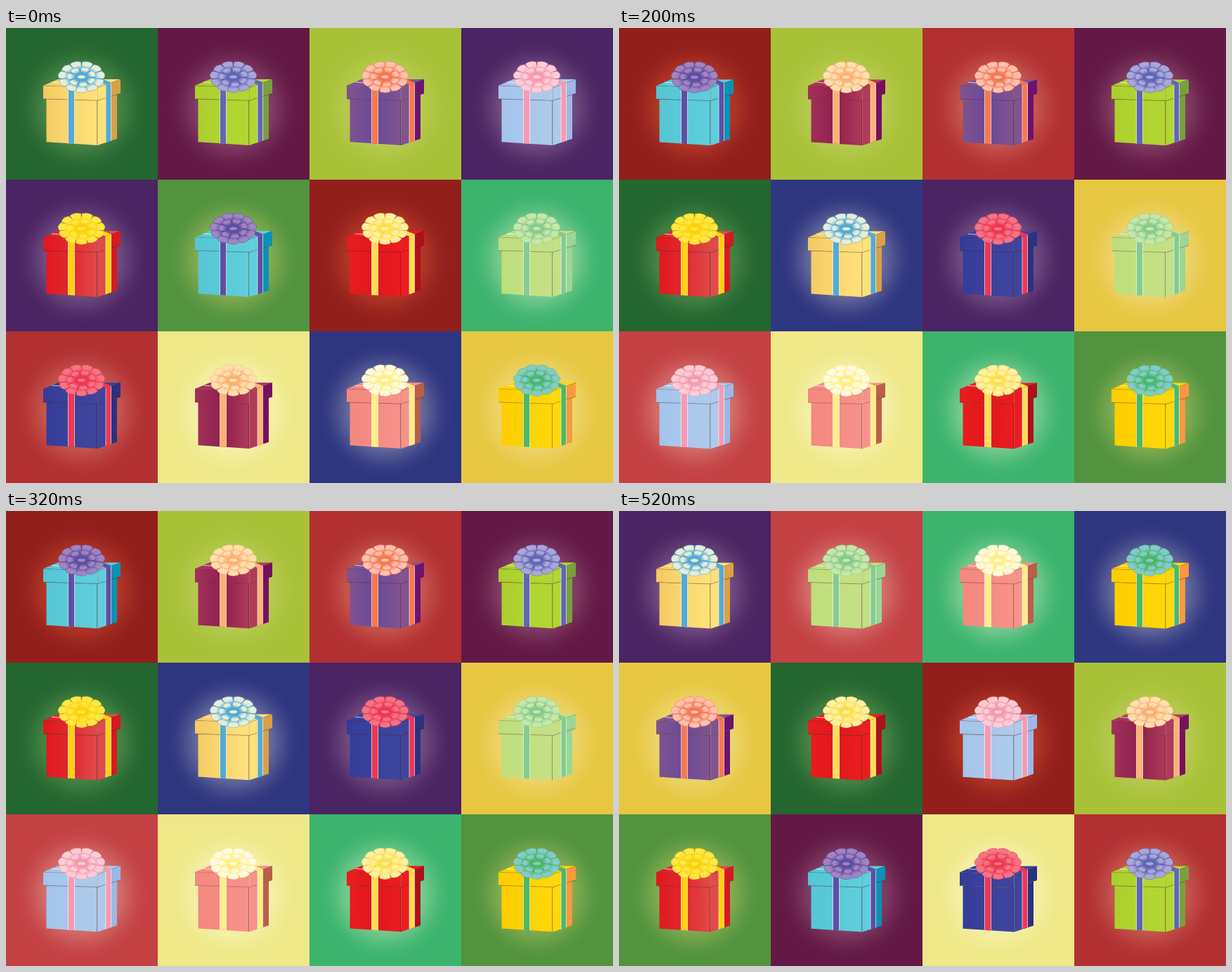
Write an HTML page with a canvas that moves like this. It is 864 px wide and 648 px high and loops after 600 ms.

```html
<!DOCTYPE html>
<html lang="en">
<head>
<meta charset="utf-8">
<title>Gift boxes</title>
<style>
html, body { margin: 0; width: 100%; height: 100%; overflow: hidden; }
canvas { display: block; }
</style>
</head>
<body>
<canvas id="stage" width="864" height="648"></canvas>
<script>
const ctx = document.getElementById('stage').getContext('2d');
const CELL = 216, HOLD = 200, TURN = Math.PI * 2;
const INK = 'rgba(50,10,30,.4)', SHEEN = 'rgba(255,255,255,.7)';

// backdrop and glow
const backs = {
  forest: ['#246630', '#548e4c'],
  plum: ['#631945', '#8b4a70'],
  lime: ['#a8c238', '#bccc5a'],
  purple: ['#4b2463', '#7c5a8a'],
  leaf: ['#52933f', '#92b456'],
  brick: ['#921f1c', '#bc3e2a'],
  mint: ['#3cb46e', '#8cd29c'],
  red: ['#b23032', '#cc6458'],
  cream: ['#efe888', '#f7f2b4'],
  navy: ['#2f3680', '#787ca6'],
  gold: ['#e7c741', '#efd97c'],
  rose: ['#c44143', '#d87e7a']
};

// front left, fold beside the ribbon, front right, far side, ribbon, bow tips
const kinds = {
  butter: ['#f4c964', '#fbd870', '#ffe17a', '#d9a048', '#55aad2', '#e4eeda'],
  apple: ['#aacf2e', '#b0d430', '#b2d632', '#7aa03c', '#6066b4', '#aaa6da'],
  violet: ['#80548e', '#6a4a98', '#80548e', '#6c1470', '#f77850', '#ffc0ae'],
  sky: ['#a4c4ec', '#a8c8ea', '#aecaea', '#9cb8e6', '#f59ab2', '#fccdd6'],
  cherry: ['#e0181e', '#e2282e', '#e04a4a', '#d61a20', '#fdd20c', '#ffe745'],
  aqua: ['#56c6d4', '#5acad8', '#60cedc', '#0c92b4', '#5f4ea4', '#a184c0'],
  scarlet: ['#ea1c1f', '#e0181c', '#ec1c20', '#b01019', '#fdde4e', '#fff0a2'],
  pale: ['#bede7c', '#c2e080', '#c4e086', '#9cd694', '#86cb90', '#c6e7a8'],
  indigo: ['#343c98', '#3a429c', '#3e459c', '#2a327f', '#f03654', '#f47484'],
  wine: ['#a4305a', '#8e204e', '#b03a5a', '#76105c', '#fdb172', '#ffe0b0'],
  salmon: ['#f4887e', '#f68c84', '#f7928a', '#ba5e48', '#feee86', '#fffbe2'],
  sun: ['#ffcd00', '#ffd204', '#ffd809', '#fb983e', '#4cb868', '#82cbca']
};

const scenes = [
  `butter/forest apple/plum violet/lime sky/purple
   cherry/purple aqua/leaf scarlet/brick pale/mint
   indigo/red wine/cream salmon/navy sun/gold`,
  `aqua/brick wine/lime violet/red apple/plum
   cherry/forest butter/navy indigo/purple pale/gold
   sky/rose salmon/cream scarlet/mint sun/leaf`,
  `butter/purple pale/rose salmon/mint sun/navy
   violet/gold scarlet/forest sky/brick wine/lime
   cherry/leaf aqua/plum indigo/cream apple/red`
].map(s => s.trim().split(/\s+/).map(c => c.split('/')));

// Box edges bend at the front corner: height at the left, corner and right
const CORNER = 130.5;
const bent = (left, mid, right) => x => x < CORNER
  ? mid + (left - mid) * (CORNER - x) / 76
  : mid + (right - mid) * (x - CORNER) / 30;
const rim = bent(82, 85, 74);
const hem = bent(101, 103.3, 94);
const base = bent(162, 167, 157);

function trace(...points) {
  ctx.beginPath();
  points.forEach(p => ctx.lineTo(...p));
}

function fill(color, ...points) {
  trace(...points);
  ctx.fillStyle = color;
  ctx.fill();
}

function stroke(color, width, ...points) {
  trace(...points);
  ctx.strokeStyle = color;
  ctx.lineWidth = width;
  ctx.stroke();
}

// Upright panel between two edges
function panel(color, x0, x1, top, bottom) {
  fill(color, [x0, top(x0)], [x1, top(x1)], [x1, bottom(x1)], [x0, bottom(x0)]);
}

function across(x0, x1, ...colors) {
  const g = ctx.createLinearGradient(x0, 0, x1, 0);
  colors.forEach((c, i) => g.addColorStop(i / (colors.length - 1), c));
  return g;
}

function backdrop([color, glow]) {
  ctx.fillStyle = color;
  ctx.fillRect(0, 0, CELL, CELL);
  const g = ctx.createRadialGradient(108, 113, 30, 108, 113, 96);
  for (let t = 0; t <= 1; t += 0.125) {
    const alpha = Math.round(255 * (1 + Math.cos(Math.PI * t)) / 2);
    g.addColorStop(t, glow + alpha.toString(16).padStart(2, '0'));
  }
  ctx.fillStyle = g;
  ctx.fillRect(0, 0, CELL, CELL);
}

// Ring of ribbon loops flaring outwards
function loops(count, turn, near, far, half, dark, light) {
  for (let i = 0; i < count; i++) {
    ctx.save();
    ctx.rotate(turn + i * TURN / count);
    ctx.beginPath();
    ctx.moveTo(near, -2);
    ctx.quadraticCurveTo(far * 0.65, -half * 0.8, far - 3, -half);
    ctx.quadraticCurveTo(far + 3, 0, far - 3, half);
    ctx.quadraticCurveTo(far * 0.65, half * 0.8, near, 2);
    ctx.closePath();
    ctx.fillStyle = across(near, far, dark, dark, light, light);
    ctx.fill();
    ctx.strokeStyle = dark;
    ctx.lineWidth = 0.6;
    ctx.stroke();
    ctx.restore();
  }
}

function disc(color, rx, ry) {
  ctx.beginPath();
  ctx.ellipse(0, 0, rx, ry, 0, 0, TURN);
  ctx.fillStyle = color;
  ctx.fill();
}

function bow(dark, light) {
  ctx.save();
  ctx.translate(107.5, 69.7);
  ctx.scale(1, 0.67);
  disc(dark, 25, 25);
  loops(11, TURN / 4, 8, 33.5, 8, dark, light);
  loops(7, 0.3 - TURN / 4, 3, 21, 6.5, dark, light);
  disc(dark, 8, 6);
  disc(light, 5.5, 3.5);
  ctx.restore();
}

function sash(color, x0, x1) {
  panel(color, x0, x1, rim, base);
  for (const x of [x0, x1]) stroke(SHEEN, 0.9, [x, rim(x)], [x, base(x)]);
}

function gift([left, fold, right, far, ribbon, tip]) {
  const front = across(54, CORNER, left, fold, right);
  const side = across(CORNER, 160, right, right, far, far);

  // body
  panel(front, 57.5, CORNER, hem, base);
  panel(side, CORNER, 158, hem, base);
  stroke(INK, 0.9, [129.5, hem(129.5)], [129.5, base(129.5)]);

  // lid
  const corners = [53, CORNER, 163];
  fill(across(53, 163, left, right, right), ...corners.map(x => [x, rim(x)]), [74, 73]);
  panel(front, 53, CORNER, rim, hem);
  panel(side, CORNER, 163, rim, hem);
  stroke(INK, 0.8, ...corners.map(x => [x, hem(x)]));
  stroke(INK, 0.5, ...corners.map(x => [x, rim(x)]));

  // ribbon
  fill(ribbon, [88.5, rim(88)], [97.5, rim(97)], [112, 73], [102, 73]);
  fill(ribbon, [142, rim(142)], [150, rim(150)], [138, 73], [126, 74]);
  stroke(SHEEN, 1, [65, 77], [78, 78]);
  sash(ribbon, 88.5, 97.5);
  sash(ribbon, 142, 149.5);

  bow(ribbon, tip);
}

function draw(n) {
  scenes[n].forEach(([kind, back], i) => {
    ctx.save();
    ctx.translate(i % 4 * CELL, Math.floor(i / 4) * CELL);
    backdrop(backs[back]);
    ctx.translate(0, n * 0.3);
    gift(kinds[kind]);
    ctx.restore();
  });
}

const start = performance.now();
let shown = -1;
function tick() {
  const n = Math.floor((performance.now() - start) / HOLD) % scenes.length;
  if (n !== shown) draw(shown = n);
  requestAnimationFrame(tick);
}
tick();
</script>
</body>
</html>
```
